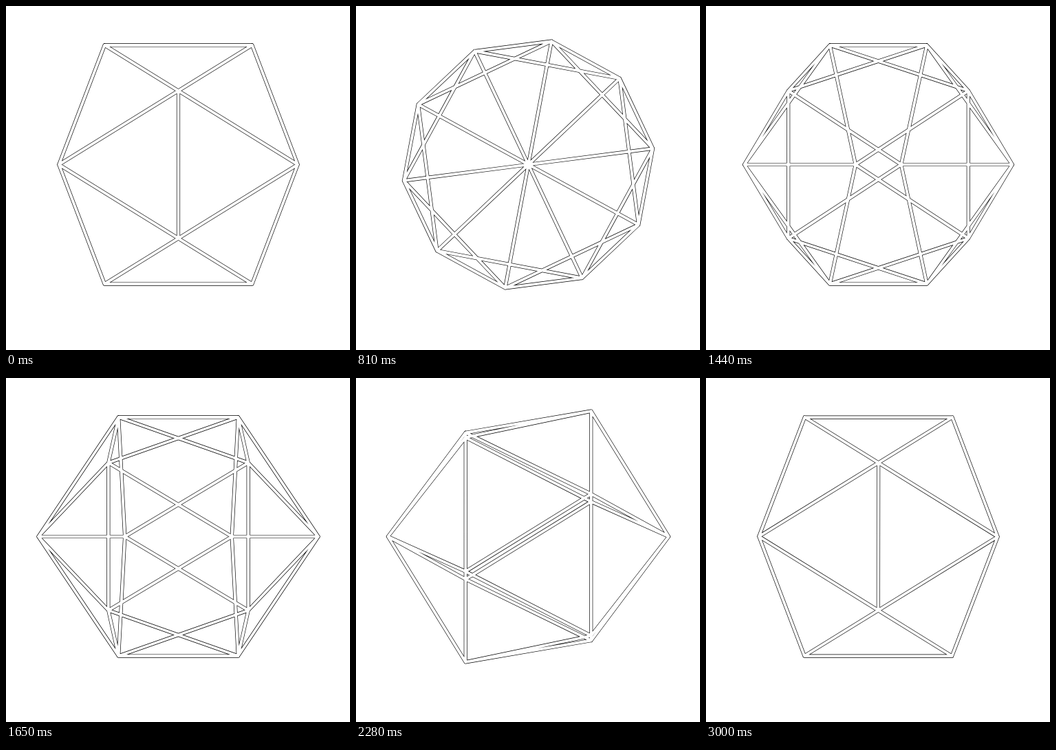
Write an HTML page with a canvas that moves like this. It is 500 px wide and 500 px high and loops after 3.03 s.

```html
<!DOCTYPE html>
<html>
<head>
<meta charset="utf-8">
<style>
html, body { margin: 0; width: 100%; height: 100%; overflow: hidden; background: #fff; }
canvas { display: block; }
</style>
</head>
<body>
<canvas id="stage" width="500" height="500"></canvas>
<script>
const ctx = document.getElementById('stage').getContext('2d');
const PHI = (1 + Math.sqrt(5)) / 2;
const SCALE = 204 / Math.hypot(1, PHI);
const CENTER = [250.5, 230.5];
const FRAME = 30, FRAMES = 101, TURN_FRAMES = 20;

// Icosahedron: cyclic permutations of (0, ±1, ±PHI), edges of length 2
const vertices = [];
for (const a of [1, -1])
  for (const b of [PHI, -PHI])
    vertices.push([0, a, b], [a, b, 0], [b, 0, a]);

const edges = [];
vertices.forEach((p, i) => vertices.forEach((q, j) => {
  const length = Math.hypot(p[0] - q[0], p[1] - q[1], p[2] - q[2]);
  if (i < j && length < 2.1) edges.push([i, j]);
}));

// Successive turns: [axis, angle], axes 0 = x, 1 = y (down), 2 = z
const tilt = Math.atan(1 / PHI);
const turns = [
  [0, tilt],
  [2, -Math.PI / 2],
  [1, -Math.atan(0.5)],
  [0, -Math.PI / 10],
  [2, tilt - Math.PI / 2]
];

const ease = t => t * t * (3 - 2 * t);

function rotate(p, axis, angle) {
  const u = (axis + 1) % 3, v = (axis + 2) % 3;
  const c = Math.cos(angle), s = Math.sin(angle);
  const q = [...p];
  q[u] = p[u] * c - p[v] * s;
  q[v] = p[u] * s + p[v] * c;
  return q;
}

function draw(progress) {
  const points = vertices.map(vertex => {
    const p = turns.reduce((q, [axis, angle], i) => {
      const t = Math.max(0, Math.min(1, progress - i));
      return rotate(q, axis, angle * ease(t));
    }, vertex);
    return [CENTER[0] + p[0] * SCALE, CENTER[1] + p[1] * SCALE];
  });

  ctx.fillStyle = '#fff';
  ctx.fillRect(0, 0, 500, 500);
  ctx.lineCap = 'round';
  ctx.beginPath();
  for (const [i, j] of edges) {
    ctx.moveTo(...points[i]);
    ctx.lineTo(...points[j]);
  }
  // Black bars under white ones leave the thin outline of their union
  for (const [color, width] of [['#000', 5.2], ['#fff', 3.9]]) {
    ctx.strokeStyle = color;
    ctx.lineWidth = width;
    ctx.stroke();
  }
}

const start = performance.now();
function tick() {
  const frame = Math.floor((performance.now() - start) / FRAME) % FRAMES;
  // The last turn stops just short of its end
  draw(Math.min(frame / TURN_FRAMES, 4.98));
  requestAnimationFrame(tick);
}
tick();
</script>
</body>
</html>
```
